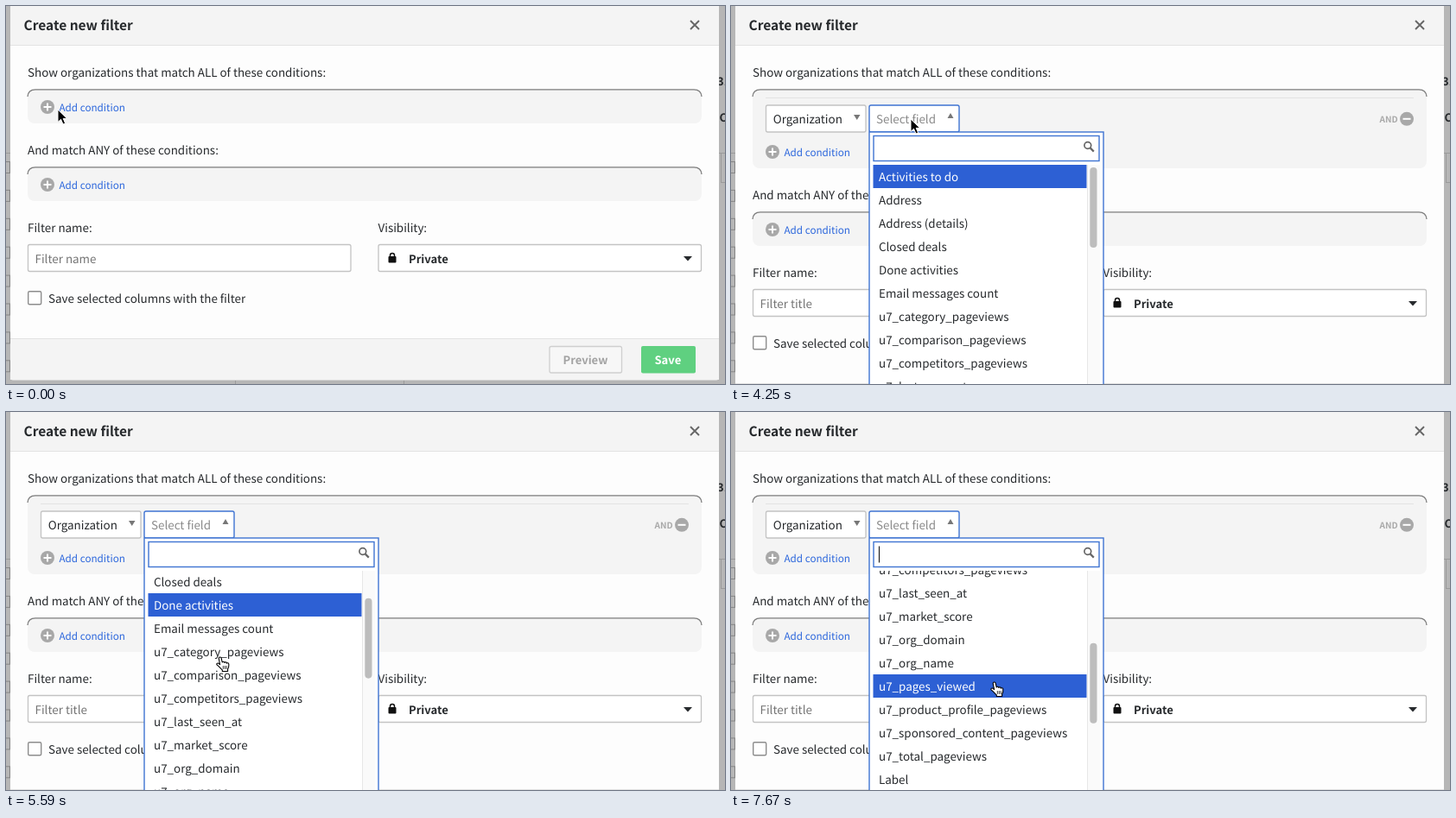
Write an HTML page that moves like this. It is 832 px wide and 438 px high and loops after 8000 ms.

```html
<!DOCTYPE html>
<html lang="en">
<head>
<meta charset="utf-8">
<title>Create new filter</title>
<style>
  html, body { margin: 0; width: 100%; height: 100%; overflow: hidden; background: #b6b6b6; }
  svg { display: block; width: 832px; height: 438px; }
  text {
    font: 13.42px "Noto Sans CJK JP", "Noto Sans CJK SC", "Noto Sans CJK KR", "Noto Sans CJK TC", "Noto Sans CJK", Lato, sans-serif;
    fill: #26292c; text-rendering: geometricPrecision; white-space: pre;
  }
  .semi { font-size: 13px; font-weight: 600; }
  .title { font-size: 15.5px; font-weight: 600; }
  .link { font-size: 11.7px; fill: #2b66dc; }
  .hint { fill: #757575; }
  .pale { fill: #8a8a8a; }
  .and { font-size: 10px; font-weight: 600; fill: #a9a9a9; }
  .box { fill: #fff; stroke: #c3c3c3; stroke-width: 1.3; }
  .panel { fill: #f4f4f4; }
  .edge { fill: none; stroke: #7d7d7d; stroke-width: 1.3; }
  .blue { fill: #fff; stroke: #3f74d2; stroke-width: 1.4; }
  .rule { stroke: #e3e3e3; }
</style>
</head>
<body>
<svg viewBox="0 0 832 438">
  <defs>
    <clipPath id="listClip"><rect x="161" y="184" width="251" height="254"/></clipPath>
    <g id="add">
      <circle cx="48" cy="117" r="8" fill="#a8a8a8"/>
      <path d="M43.5 117h9M48 112.5v9" stroke="#fff" stroke-width="2"/>
      <text class="link" x="61.5" y="121.6">Add condition</text>
    </g>
    <path id="edge" class="edge" d="M25 105Q25.500 96.800 34 96.800H796Q804.500 96.800 805 105"/>
  </defs>

  <!-- dimmed page -->
  <rect width="832" height="438" fill="#b6b6b6"/>
  <path d="M0 170.500H832M827.500 170V204M827 204.500H832M265.500 434V438M460.500 434V438" stroke="#9a9a9a" fill="none"/>
  <g id="ticks" fill="none" stroke="#858585"></g>
  <text class="semi" x="823" y="92">31</text>
  <text class="semi" x="825.500" y="134">C</text>

  <!-- dialog -->
  <rect id="dialog" x="5" y="-10" width="820" height="443.500" rx="3" fill="#fdfdfd"/>
  <rect x="5" width="820" height="45" fill="#f4f4f4"/>
  <path class="rule" d="M5 45.500H825"/>
  <text class="title" x="20.500" y="28">Create new filter</text>
  <path d="M792 17l10 10M802 17l-10 10" stroke="#666" stroke-width="1.9"/>
  <text x="25" y="81.500">Show organizations that match ALL of these conditions:</text>

  <rect id="panel" class="panel" x="25" y="97" width="780" height="39" rx="8"/>
  <use href="#edge"/>

  <g id="row">
    <path class="rule" d="M40 106.500H790"/>
    <rect class="box" x="40.500" y="115" width="115.500" height="31" rx="2"/>
    <text x="48.700" y="135.500">Organization</text>
    <path d="M142 126h7.500l-3.750 6z" fill="#777"/>
    <rect id="field" class="box" x="160" y="115" width="104" height="31" rx="2"/>
    <text class="pale" x="168" y="135.500">Select field</text>
    <path id="fieldArrow" fill="#777"/>
    <text class="and" x="750.500" y="134.800">AND</text>
    <circle cx="782" cy="130.800" r="8" fill="#a8a8a8"/>
    <path d="M777.500 130.800h9" stroke="#fff" stroke-width="2"/>
  </g>

  <g id="lower">
    <use href="#add"/>
    <text x="25" y="171.500">And match ANY of these conditions:</text>
    <rect class="panel" x="25" y="187" width="780" height="39" rx="8"/>
    <use href="#edge" y="90"/>
    <use href="#add" y="90"/>
    <text x="25" y="261.500">Filter name:</text>
    <text x="430.500" y="261.500">Visibility:</text>
    <rect class="box" x="25.500" y="276.500" width="373.500" height="31" rx="2"/>
    <text id="hint" class="hint" x="33.500" y="297.500"></text>
    <rect class="box" x="431" y="276.500" width="373.500" height="31" rx="2"/>
    <rect x="442.500" y="290" width="9" height="7.500" rx="1" fill="#111"/>
    <path d="M444.500 291v-2a2.500 2.500 0 0 1 5 0v2" fill="none" stroke="#111" stroke-width="1.500"/>
    <text class="semi" x="466" y="297.500">Private</text>
    <path d="M784 290h10l-5 5.500z" fill="#26292c"/>
    <rect x="25.700" y="330.700" width="15" height="15" rx="1.500" fill="#fff" stroke="#8d8d8d" stroke-width="1.400"/>
    <text x="49" y="343.500">Save selected columns with the filter</text>
    <rect x="5" y="386" width="820" height="47" fill="#f4f4f4"/>
    <path class="rule" d="M5 385.500H825"/>
    <rect x="629" y="394.500" width="83.500" height="30.500" rx="2" fill="#f7f7f7" stroke="#cfcfcf" stroke-width="1.300"/>
    <text class="semi" x="644.500" y="415" style="fill:#a3a3a3">Preview</text>
    <rect x="735" y="394" width="63" height="31.500" rx="2" fill="#5fd080"/>
    <text class="semi" x="750.500" y="415" style="fill:#fff">Save</text>
  </g>

  <g id="menu">
    <rect class="blue" x="160" y="146" width="271" height="310"/>
    <rect class="blue" x="165" y="150.500" width="261" height="29"/>
    <circle cx="412.800" cy="161.500" r="3.900" fill="none" stroke="#666" stroke-width="1.700"/>
    <path d="M415.600 164.400l4.200 4.200" stroke="#666" stroke-width="2.200"/>
    <path id="caret" d="M171.500 155.500v19" stroke="#222" stroke-width="1.200"/>
    <g clip-path="url(#listClip)">
      <g id="list"><rect id="glow" x="164.500" width="247" height="27" fill="#2d60d4"/></g>
    </g>
    <rect x="412" y="184" width="15" height="254" fill="#fafafa"/>
    <path d="M412.500 184V438" stroke="#e7e7e7"/>
    <rect id="thumb" x="415.300" width="8.200" height="93" rx="4.100" fill="#bdbdbd"/>
  </g>

  <path id="arrow" d="M0 0V14.500L3.500 11.300L6 17L8.600 15.900L6.200 10.400H10.700Z" fill="#000" stroke="#fff" stroke-width="1" stroke-linejoin="round"/>
  <g id="hand" stroke="#000" stroke-linejoin="round" stroke-linecap="round">
    <path d="M.2 1.500C.2-.4 2.900-.6 3.200 1.300L4.200 6C4.600 4.800 6.700 5 6.800 6.400C7.300 5.400 9.300 5.700 9.400 7.100C10.200 6.300 11.700 6.900 11.800 8.200C12 11 11.500 12.500 10.600 14V16.500H4.300V14.800C2.600 13.300.9 11.200-1.700 9.100C-2.900 7.800-1.400 6.500 0 7.300L1.600 8.600Z" fill="#fff" stroke-width="1.100"/>
    <path d="M5.300 10.500v3M7.300 10.500v3M9.200 10.500v3" stroke-width=".8" fill="none"/>
  </g>
</svg>
<script>
const LOOP = 8000, FPS = 12, ROW = 27, LIST_TOP = 184;
const ADD = 19, RENAME = 20, OPEN = 44;   // ticks of the hard changes

const $ = id => document.getElementById(id);
const set = (id, attrs) => { for (const k in attrs) $(id).setAttribute(k, attrs[k]); };
const show = (id, on) => set(id, { visibility: on ? "visible" : "hidden" });
const move = (id, x, y) => set(id, { transform: `translate(${x} ${y})` });
const make = (parent, tag, attrs) => {
  const el = document.createElementNS("http://www.w3.org/2000/svg", tag);
  for (const k in attrs) el.setAttribute(k, attrs[k]);
  return $(parent).appendChild(el);
};

const tracked = ["category_pageviews", "comparison_pageviews", "competitors_pageviews", "last_seen_at",
  "market_score", "org_domain", "org_name", "pages_viewed", "product_profile_pageviews",
  "sponsored_content_pageviews", "total_pageviews"];
const options = ["Activities to do", "Address", "Address (details)", "Closed deals", "Done activities",
  "Email messages count", ...tracked.map(name => "u7_" + name), "Label"];
const labels = options.map((name, i) => {
  const el = make("list", "text", { x: 171, y: LIST_TOP + 18.5 + i * ROW });
  el.textContent = name;
  return el;
});
for (let i = 0; i < 8; i++) make("ticks", "rect", { x: -9.5, y: 180.5 + i * 32.9, width: 14, height: 13 });

// [tick, value...]
const pointer = [[0, 60, 120], [3, 67, 118], [30, 67, 118], [31, 74, 124], [33, 130, 126], [36, 204, 124],
  [39, 204, 124], [40, 206, 125], [42, 208, 127], [44, 208, 131], [51, 208, 131], [54, 210, 168],
  [57, 214, 210], [59, 215, 217], [60, 217, 222], [63, 247, 284], [67, 247, 284], [76, 247, 288],
  [80, 247, 288], [84, 301, 310], [86, 301, 310], [87, 304, 313]];
const scrolling = [[57, 0], [59, 10], [63, 10], [67, 82], [71, 138], [76, 205], [80, 231]];
const hover = [[0, 0], [58, 1], [61, 2], [62, 3], [63, 4], [70, 7], [73, 9], [76, 11], [79, 12], [82, 13]];

function tween(track, tick) {
  const i = track.findIndex(key => key[0] > tick);
  if (i < 0) return track[track.length - 1].slice(1);
  if (i === 0) return track[0].slice(1);
  const a = track[i - 1], b = track[i], p = (tick - a[0]) / (b[0] - a[0]);
  return a.slice(1).map((v, n) => v + (b[n + 1] - v) * p);
}
const step = (track, tick) => track.filter(key => key[0] <= tick).pop()[1];

function draw(ms) {
  const tick = Math.floor(ms * FPS / 1000 + 1e-6);
  const added = tick >= ADD, open = tick >= OPEN;

  set("dialog", { height: added ? 495.5 : 443.5 });
  set("panel", { height: added ? 91 : 39 });
  move("lower", 0, added ? 52 : 0);
  show("row", added);
  $("hint").textContent = tick >= RENAME ? "Filter title" : "Filter name";
  set("field", { class: open ? "blue" : "box" });
  set("fieldArrow", { d: open ? "M250.500 130h7l-3.500-6z" : "M250.300 126h7.500l-3.750 6z" });

  const [scroll] = tween(scrolling, tick), active = step(hover, tick);
  set("menu", { display: open ? "inline" : "none" });
  move("list", 0, -scroll);
  set("glow", { y: LIST_TOP + active * ROW });
  labels.forEach((el, i) => { el.style.fill = i === active ? "#fff" : ""; });
  set("thumb", { y: 187 + scroll * 0.35 });
  set("caret", { opacity: (ms - 3670 + LOOP) % 1000 < 575 ? 1 : 0 });

  const [x, y] = tween(pointer, tick);
  const arrow = tick < 2 || (tick >= OPEN && y < LIST_TOP);
  show("arrow", arrow);
  show("hand", !arrow);
  move("arrow", x, y);
  move("hand", x - 1, y);
}

function loop() {
  draw(performance.now() % LOOP);
  requestAnimationFrame(loop);
}
loop();
</script>
</body>
</html>
```
